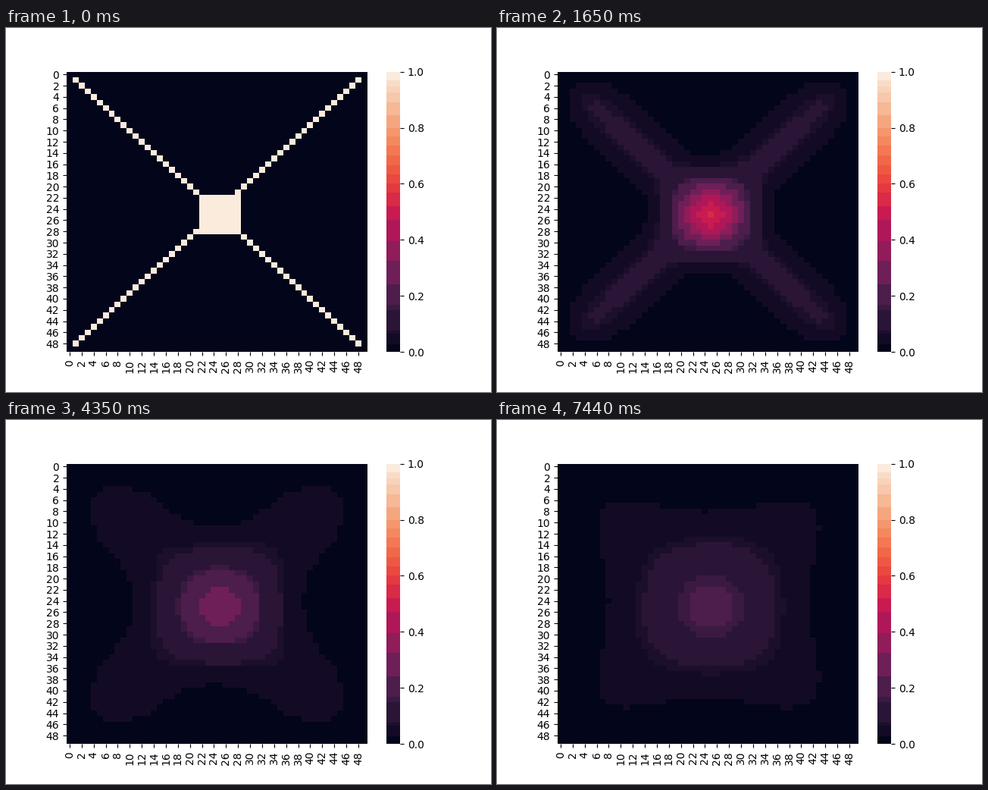
Animation, 640 px wide and 480 px high, one loop 7500 ms. Source, as a matplotlib script:

```python
import numpy as np
import matplotlib.pyplot as plt
from matplotlib.animation import FuncAnimation
from matplotlib.colors import BoundaryNorm, LinearSegmentedColormap, ListedColormap

N = 50          # grid cells per side
FRAMES = 250
GAMMA = 0.1     # diffusion per step

STOPS = [
    (0, "#03051a"), (1 / 7, "#35193e"), (0.2, "#4c1d4b"), (0.25, "#611f53"),
    (2 / 7, "#701f57"), (1 / 3, "#841e5a"), (0.4, "#a11a5b"), (3 / 7, "#ad1759"),
    (0.5, "#cb1b4f"), (4 / 7, "#e13342"), (0.6, "#e83f3f"), (2 / 3, "#f06043"),
    (5 / 7, "#f37651"), (0.75, "#f4875e"), (0.8, "#f69c73"), (6 / 7, "#f6b48f"),
    (1, "#faebdd"),
]
EDGES = np.array([
    0, 0.027, 0.0645, 0.0774, 0.149, 0.167, 0.241, 0.325, 0.396, 0.471, 0.52,
    0.568, 0.601, 0.634, 0.666, 0.70, 0.736, 0.769, 0.80, 0.845, 0.89, 0.926,
    0.948, 0.97, 1,
])


def banded_cmap():
    smooth = LinearSegmentedColormap.from_list("heat", STOPS, N=1024)
    mids = (EDGES[:-1] + EDGES[1:]) / 2
    mids[0], mids[-1] = 0, 1
    return ListedColormap(smooth(mids))


def start_plate():
    u = np.zeros((N, N))
    i = np.arange(1, N - 1)
    u[i, i] = 1
    u[i, N - 1 - i] = 1
    u[22:29, 22:29] = 1
    return u


def diffuse(u):
    """One explicit heat step; the rim stays cold."""
    new = u.copy()
    new[1:-1, 1:-1] += GAMMA * (u[2:, 1:-1] + u[:-2, 1:-1] + u[1:-1, 2:]
                                + u[1:-1, :-2] - 4 * u[1:-1, 1:-1])
    return new


states = [start_plate()]
while len(states) < FRAMES:
    states.append(diffuse(states[-1]))

cmap = banded_cmap()
norm = BoundaryNorm(EDGES, cmap.N, clip=True)

fig = plt.figure(figsize=(6.4, 4.8), dpi=100, facecolor="white")
ax = fig.add_axes([0.125, 0.11, 0.62, 0.77])
mesh = ax.pcolormesh(states[0], cmap=cmap, norm=norm)
ticks = np.arange(0, N, 2)
ax.set_xticks(ticks + 0.5, ticks, rotation=90)
ax.set_yticks(ticks + 0.5, ticks)
ax.set(xlim=(0, N), ylim=(N, 0))

bar = fig.add_axes([0.78375, 0.11, 0.028875, 0.77])
levels = (EDGES[:-1] + EDGES[1:]) / 2
bar.pcolormesh([0, 1], EDGES, levels[:, None], cmap=cmap, norm=norm)
bar.set(xlim=(0, 1), ylim=(0, 1), xticks=[])
bar.yaxis.tick_right()
bar.set_yticks(np.linspace(0, 1, 6), [f"{v:.1f}" for v in np.linspace(0, 1, 6)])

for a in (ax, bar):
    a.spines[:].set_visible(False)


def update(k):
    mesh.set_array(states[k])
    return (mesh,)


anim = FuncAnimation(fig, update, frames=FRAMES, interval=30, repeat=True,
                     repeat_delay=0)
plt.show()
```
